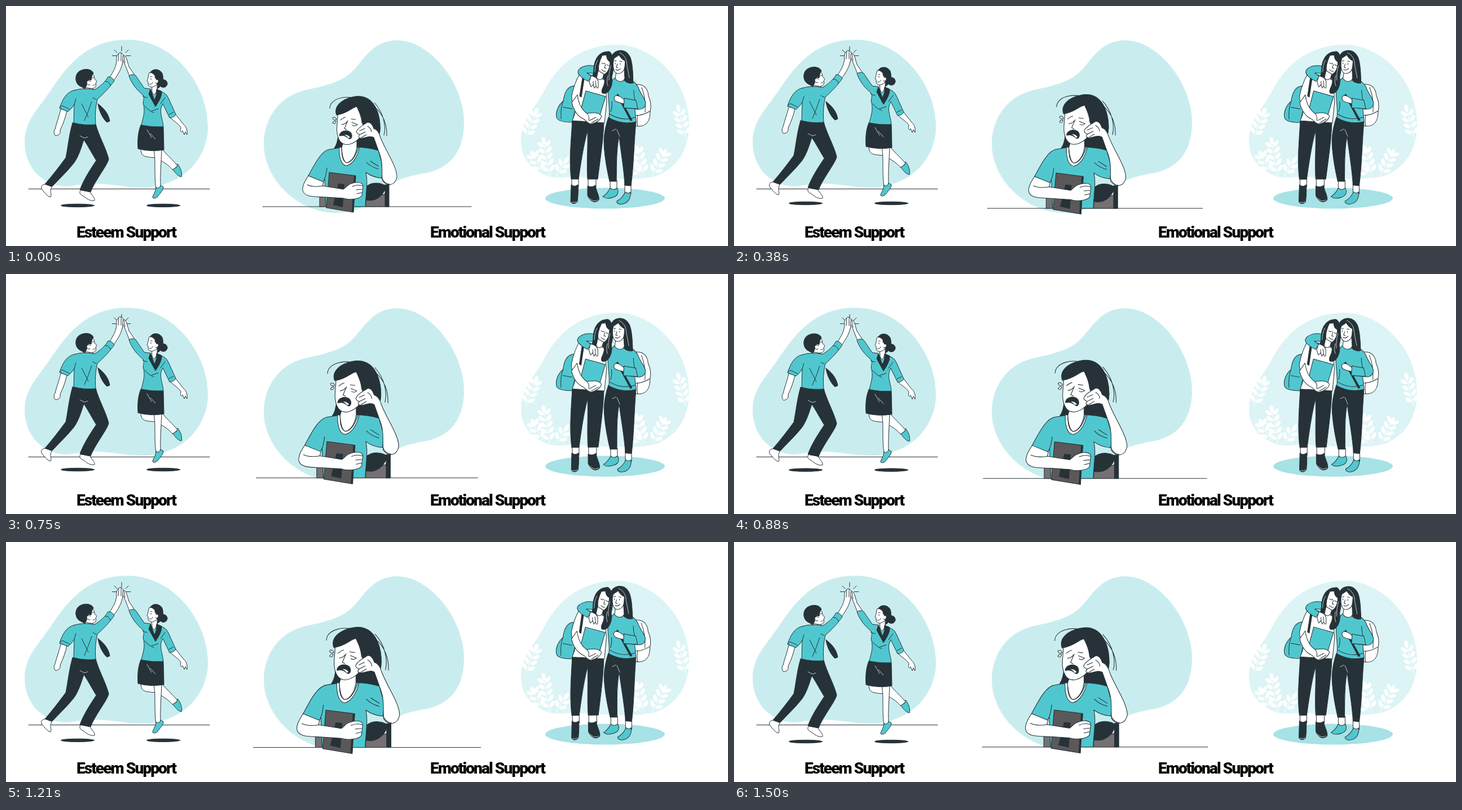
Animation of 1280 by 427 pixels, one loop 1540 ms. Source, as an HTML page:

```html
<!DOCTYPE html>
<html lang="en">
<head>
<meta charset="utf-8">
<title>Kinds of support</title>
<style>
html, body { margin: 0; width: 100%; height: 100%; overflow: hidden; background: #fff; }
svg { display: block; width: 100%; height: 100%; }
g { stroke: #263238; stroke-linejoin: round; stroke-linecap: round; fill: none; }
.w { fill: #fff; }
.t { fill: #50c7cf; }
.d { fill: #263238; }
.n { stroke: none; }
.l { stroke: #fff; stroke-width: .7; }
.blob { fill: #c9edef; stroke: none; }
text { font: 900 28px Roboto, Inter, sans-serif; letter-spacing: -1.9px; text-anchor: middle; }
</style>
</head>
<body>
<svg viewBox="0 0 1280 427">
<path class="blob" d="M33 243C33 205 54 187 78 152C105 112 140 60 215 60C297 60 358 140 358 215C358 268 316 323 240 323C200 322 170 312 130 318C105 322 88 324 62 305C42 290 33 265 33 243Z"/>
<path class="blob" d="M457 245C457 205 480 162 530 150C568 141 598 136 619 111C640 87 655 61 694 61C750 61 812 135 812 208C812 255 790 288 745 297C715 303 695 305 670 328C645 352 625 368 583 368C520 368 457 310 457 245Z"/>
<path class="blob" style="fill:#dcf4f5" d="M913 240C913 205 935 185 952 155C972 115 1010 69 1082 69C1150 69 1211 135 1211 210C1211 255 1190 290 1150 303C1110 312 1060 306 1010 304C985 303 975 310 950 298C925 285 913 265 913 240Z"/>
<g id="leaves"></g>
<ellipse cx="1062" cy="342" rx="106" ry="18.5" fill="#a6e2e6"/>

<g>
  <path d="M40 325.500H361M205 72v8M192 78l5 5M217 78l-5 5M188 88.500h8M213 88.500h8"/>
</g>

<g id="jump">
  <ellipse class="d" cx="127" cy="355" rx="29.500" ry="2.700"/>
  <ellipse class="d" cx="279" cy="355" rx="29.500" ry="2.700"/>

  <!-- man -->
  <path class="w" d="M69 317C63 318 61 322 64 327C69 332 73 339 79 340C82 335 76 331 81 322Z"/>
  <path class="w" d="M132 328C129 333 132 336 137 338C143 343 150 348 157 346C158 341 152 337 149 331Z"/>
  <path class="d" d="M118 208L159 210C164 230 177 252 182 272C181 282 158 310 150 331L131 327C138 308 150 290 160 275C152 262 146 250 138 238C134 250 129 268 120 280C108 295 94 308 82 321L69 317C82 302 95 285 106 270C110 250 112 228 118 208Z"/>
  <path class="l" d="M131 231l8 4l6-2"/>
  <path class="w" d="M97 184C94 197 89 210 87 219C84 223 85 229 88 231C93 230 97 228 96 221C101 210 106 198 108 186Z"/>
  <path class="d" d="M163 174C165 188 172 201 179 207L184 205C182 192 174 182 163 174Z"/>
  <path class="w" d="M183 128C191 116 195 108 196 98C195 92 197 85 202 83C208 83 209 90 207 97C206 110 199 122 190 134Z"/>
  <path class="w" d="M140 138L140 149Q149 154 154 147V140Z"/>
  <path class="t" d="M121 150Q137 145 157 149C167 143 176 135 181 126Q188 126 192 133C183 146 173 156 162 166C158 182 158 196 159 211Q138 213 120 208L121 175C118 181 113 185 110 188L95 182C99 169 106 153 121 150Z"/>
  <path d="M121 175l3-10M95 182q3-5 6-4l12 6M176 134q7 0 9 7M134 174l12 24M152 170q-6 18-13 34M160 166q-3 0-6-3"/>
  <path class="w" d="M147 120C156 119 157 126 157 130Q163 134 159 137C161 142 158 147 152 147L140 145L138 134Z"/>
  <path class="d" d="M132 143C121 138 121 120 132 115C142 110 153 113 155 120C152 123 152 127 151 132L147 131C144 133 143 137 143 141L140 147Z"/>
  <path class="w" d="M150 134q-6-3-7 2q1 6 6 4"/>
  <path d="M153 128l3-1M154 141q3 1 4-2"/>

  <!-- woman -->
  <path class="w" d="M239 254C239 270 249 268 263 270C278 275 290 285 296 292L304 284C295 273 289 269 278 256Z"/>
  <path class="t" d="M296 291C301 298 305 303 311 304C313 296 309 287 304 281Q304 285 302 287Z"/>
  <path class="w" d="M262 256C266 275 262 300 266 326L274 323C273 302 275 280 276 256Z"/>
  <path class="t" d="M266 323C265 332 260 336 260 341Q264 344 269 339C273 333 279 328 279 322L274 319Q272 326 266 323Z"/>
  <path class="w" d="M219 125C214 112 211 104 208 98C205 90 208 86 211 89C215 94 216 103 218 108L230 126Z"/>
  <path class="w" d="M290 198C300 207 308 211 310 217C308 222 311 227 313 222L316 229L318 224L321 229C322 220 319 214 315 211L301 193Z"/>
  <path class="w" d="M258 140L259 153Q264 168 268 152L268 140Z"/>
  <path class="t" d="M256 148C260 158 264 163 267 149L279 154Q285 157 288 164L301 193Q297 199 290 199L278 174C270 188 278 200 279 215Q259 217 240 212C242 200 248 190 243 172C245 164 245 160 240 156C229 147 221 134 218 124Q225 120 230 124L245 146Z"/>
  <path class="d" d="M256 148L253 157L265 179C270 171 276 163 276 152L267 148Q268 160 263 167Z"/>
  <path d="M242 160q4 3 8 3M246 178q6 8 16 12M258 187l12-4M282 163l-8 11M289 193l8-4"/>
  <path class="d" d="M239 212Q259 216 279 215L280 256Q255 260 234 254C233 238 234 224 239 212Z"/>
  <path class="l" d="M250 220l8 14M256 227l9 10"/>
  <circle class="d" cx="279" cy="138" r="7"/>
  <path class="w" d="M254 119C251 125 253 128 250 133Q253 135 252 138C252 144 258 146 263 143L272 137L267 118Z"/>
  <path class="d" d="M256 118C260 111 272 111 277 120C281 132 276 144 268 147C270 142 269 139 266 137Q268 130 264 127Q266 122 256 118Z"/>
  <path class="w" d="M266 131q5-1 4 4q-2 4-5 2"/>
  <path d="M256 126q2-1 3 0M257 129v2M254 139q4 2 6-3M200 85l-1 13M204 84v14M209 89l2 12"/>
</g>

<g id="grow">
  <path d="M455 357H825"/>
  <path fill="#757173" d="M556 334L568 334L568 357H556ZM638 346L672 334L679 357H638Z"/>
  <path class="d" d="M672 318H679V357H672ZM638 322C650 310 668 316 673 320C672 334 657 350 638 345ZM556 280Q557 266 567 262L563 280Z"/>
  <path class="d" d="M589 228Q588 245 582 253L597 253L600 225ZM590 192C607 152 660 152 663 212C666 236 650 240 665 263L618 262L620 200Z"/>
  <path class="t" d="M593 252L621 251Q645 252 660 257L668 285L666 306Q650 305 638 296C642 312 638 334 637 357L567 357L565 308L562 313Q547 310 536 302C545 286 558 257 574 255Z"/>
  <path class="w" d="M591 251C590 265 593 284 604 284C616 281 625 264 627 250L625 252C621 264 614 278 604 279C596 276 595 264 595 252Z"/>
  <path class="w" d="M600 236L595 252C596 267 598 277 604 279C613 277 620 266 622 251V230Z"/>
  <path d="M569 288q-1 12-5 22M639 278q7 8 21 12M646 276l14 9"/>
  <path class="w" d="M588 188C589 203 585 214 587 226C589 240 596 249 609 246C623 242 630 232 634 222L634 180L605 174Z"/>
  <path class="d" d="M586 194C580 178 596 166 614 162C648 154 661 183 663 211C655 226 635 222 631 207C630 194 625 186 622 179C612 181 606 191 586 194Z"/>
  <path d="M574 182C574 166 600 156 628 167M653 172C670 190 674 215 670 230M654 180Q676 200 675 231"/>
  <path d="M593 203q6-5 9-5M595 211q7-1 9-5M613 207l10 4q-5 4-9 1M606 204q-4 9-6 14l4 2M612 201l8 1"/>
  <path class="d" d="M591 231C592 222 604 219 611 225C615 230 613 238 608 236C601 230 598 230 591 231Z"/>
  <path class="w n" d="M600 229q7 0 10 5l-3 1q-3-4-7-6Z"/>
  <path class="w" d="M579 199q5-3 7 3q-6 2-7-3ZM579 208q3-5 6-3q-1 6-6 3Z"/>
  <path class="w" d="M622 222C625 216 634 211 641 207C647 206 650 212 652 218C659 220 662 227 664 234C673 258 693 285 693 304C690 320 676 322 667 310C666 290 668 280 663 265L652 234C644 229 634 237 628 235Q623 233 627 229Q620 226 622 222Z"/>
  <path d="M627 222l9-4M627 229l10-5M630 234l9-5M641 214q6 3 7 10M666 305q5 12 14 12"/>
  <path fill="#5b5859" d="M573 296L620 302L616 367L568 359Z"/>
  <path class="d n" d="M617 302L620 302L616 367L613 366ZM589 316L600 317L597 358L580 354Z"/>
  <path class="w" d="M536 302C531 310 525 319 526 328C529 341 549 339 567 340L598 342C610 346 628 343 631 337L633 320C632 312 620 313 612 316C605 318 602 324 598 326L561 320L563 313Z"/>
  <path d="M534 318q10 5 28 2M614 321q9-4 18-1M621 327l10-1M622 334l9-2"/>
</g>

<g id="sway">
  <!-- bags -->
  <path class="t" d="M1007 142C996 143 990 153 988 169C980 176 974 187 976 198C978 206 992 207 1004 207L1010 180Z"/>
  <path d="M988 169q-5 12-4 32M988 180l16 3"/>
  <path class="w" d="M1113 140C1130 137 1138 146 1139 160C1144 171 1144 180 1142 188C1142 206 1134 214 1122 214C1110 213 1102 206 1100 196Z"/>
  <path d="M1102 193q20 6 40-6M1120 214q-2-8 0-20M1127 145q8 20 6 44"/>

  <!-- left friend -->
  <path class="w" d="M1003 306H1015V322H1003ZM1032 306H1046V322H1032Z"/>
  <path class="d" d="M1002 318Q1008 323 1014 318C1015 330 1014 340 1013 348Q1006 355 1001 348ZM1031 320Q1038 324 1045 319C1046 330 1053 338 1051 345C1043 353 1035 346 1031 337Z"/>
  <path class="l" d="M1003 349q5 2 9-1M1034 342q8 8 15 3"/>
  <path class="d" d="M1004 204L1060 207C1059 240 1053 275 1049 308L1031 308C1029 280 1032 250 1031 222C1023 250 1019 280 1015 308L1002 308C998 275 1002 237 1004 204Z"/>
  <path class="w" d="M1017 121C1030 119 1050 126 1062 132L1065 170L1061 208L1004 204Q1008 194 1010 186C1004 174 1001 164 1004 155Q1008 137 1017 121Z"/>
  <path class="d" d="M1025 130L1020 162L1017 160L1022 128Z"/>
  <path class="t" d="M1028 151L1063 161L1052 197L1018 188Z"/>
  <path class="w" d="M1013 158C1015 174 1021 185 1030 191C1040 190 1050 188 1056 196Q1053 206 1038 210C1030 209 1029 204 1024 201Q1009 195 1003 172Z"/>
  <path d="M1030 191q5 5 3 12M1034 204l12-6M1038 208l12-7"/>

  <!-- right friend -->
  <path class="w" d="M1071 310H1083V328H1071ZM1097 316H1108V334H1097Z"/>
  <path class="t" d="M1071 324Q1077 329 1083 324C1087 330 1085 338 1077 340C1070 343 1062 343 1058 339Q1066 334 1071 324ZM1098 331Q1104 335 1107 331C1108 342 1103 350 1094 352C1088 354 1082 351 1083 347Q1092 343 1098 331Z"/>
  <path class="d" d="M1068 198L1117 206C1113 245 1113 284 1108 320L1097 319C1096 292 1090 260 1087 232C1081 258 1083 288 1082 312L1070 312C1064 285 1060 260 1060 238C1061 222 1064 210 1068 198Z"/>
  <path class="l" d="M1083 220l5 12M1081 219l-6 3"/>
  <path class="t" d="M1079 128L1110 133Q1118 138 1121 145C1124 155 1134 166 1134 173C1133 184 1124 185 1115 183L1117 206Q1092 212 1069 199C1072 180 1064 155 1070 138Z"/>
  <path class="d" d="M1083 158L1085 157L1110 203L1107 204Z"/>
  <path d="M1070 192q22 14 46 6M1095 181l22 2M1113 150q0 12 3 20M1074 170q1 10-2 18"/>
  <path class="w" d="M1096 167C1091 162 1085 158 1080 160Q1076 164 1080 169Q1086 172 1096 174Z"/>
  <path class="t" d="M1096 164L1117 168L1120 183L1095 181Z"/>

  <!-- embracing arm -->
  <path class="t" d="M1044 107C1032 104 1020 107 1015 114C1011 120 1020 128 1032 134L1038 125L1030 119L1043 120Z"/>
  <path class="w" d="M1037 125C1043 124 1048 128 1050 134L1050 144Q1048 149 1046 142L1043 146L1041 140L1037 144L1034 135Z"/>
  <path d="M1041 134v7M1045 133l1 8"/>

  <!-- heads -->
  <path class="d" d="M1069 81C1055 80 1046 90 1043 104C1041 112 1043 117 1040 124C1048 132 1059 125 1061 131C1063 143 1053 148 1057 155C1068 159 1077 142 1074 126C1078 113 1079 86 1069 81Z"/>
  <path class="w" d="M1057 88C1052 98 1049 108 1051 117Q1055 125 1062 121C1069 116 1071 106 1071 99Q1065 96 1065 87Z"/>
  <path class="w" d="M1050 115L1047 128Q1053 134 1058 128L1060 121Z"/>
  <path class="d" d="M1065 84Q1063 95 1072 100L1073 88Z"/>
  <path d="M1056 101q3 3 6 1M1065 104q3 3 5 2M1063 104l-2 6l3 1M1056 113q3 4 7 3"/>
  <path class="l" d="M1072 106q-4 14-3 26M1067 124q-3 10 0 18M1049 96q-5 9-5 21"/>
  <path class="d" d="M1089 79C1078 80 1071 88 1074 100L1083 118L1097 133Q1104 139 1112 137C1111 122 1112 106 1107 92Q1101 79 1089 79Z"/>
  <path class="w" d="M1082 116L1080 129C1085 136 1094 136 1097 129L1096 112Z"/>
  <path class="w" d="M1078 93C1075 103 1076 114 1081 119C1088 123 1096 117 1097 108L1098 96Q1090 94 1087 87Z"/>
  <path class="d" d="M1087 84Q1089 94 1098 98L1100 88Z"/>
  <path d="M1080 101v2M1089 102v2M1079 98l3-1M1088 98l4 1M1084 103l-2 6l3 1M1081 113q5 3 9-2"/>
  <path class="l" d="M1088 83q13 6 13 23l4 22"/>
</g>

<text x="213" y="411.500">Esteem Support</text>
<text x="853.500" y="411.500">Emotional Support</text>
</svg>
<script>
const LOOP = 1540;
const el = id => document.getElementById(id);

// Branches: base x, base y, lean in degrees, length
const branches = [[921, 234, 22, 50], [964, 301, -10, 62], [976, 301, 33, 32], [951, 296, -28, 36],
  [1205, 234, -14, 54], [1131, 301, -15, 48], [1146, 301, 28, 45], [1126, 303, -40, 30]];
el('leaves').innerHTML = branches.map(([x, y, lean, length]) => {
  let parts = `<path stroke="#fff" d="M0 0V${-length}"/><ellipse cy="${-length}" rx="3.5" ry="7"/>`;
  for (let h = 7; h < length - 4; h += 11)
    for (const side of [-1, 1])
      parts += `<ellipse rx="3.3" ry="6.5" transform="translate(${side * 6.5} ${-h - 5}) rotate(${side * 45})"/>`;
  return `<g class="w n" style="stroke:none" transform="translate(${x} ${y}) rotate(${lean})">${parts}</g>`;
}).join('');

function track(keys, t) {
  const i = Math.max(1, keys.findIndex(k => k[0] >= t));
  const [t0, a] = keys[i - 1], [t1, b] = keys[i];
  return a + (b - a) * (t - t0) / (t1 - t0);
}
const growth = [[0, 1], [1080, 1.088], [1200, 1.09], [1330, 1.0865], [LOOP, 1.08]];
const tilt = [[0, 0], [210, -0.05], [580, -0.35], [1080, -0.9], [1330, -0.55], [LOOP, -0.15]];

function draw(now) {
  const t = now % LOOP;
  const lift = 3.5 * (Math.cos(2 * Math.PI * (t + 40) / LOOP) - 1);
  el('jump').setAttribute('transform', `translate(0 ${lift})`);
  el('grow').setAttribute('transform', `translate(640 262) scale(${track(growth, t)}) translate(-640 -262)`);
  el('sway').setAttribute('transform', `rotate(${track(tilt, t)} 1057 215)`);
  requestAnimationFrame(draw);
}
draw(performance.now());
</script>
</body>
</html>
```
